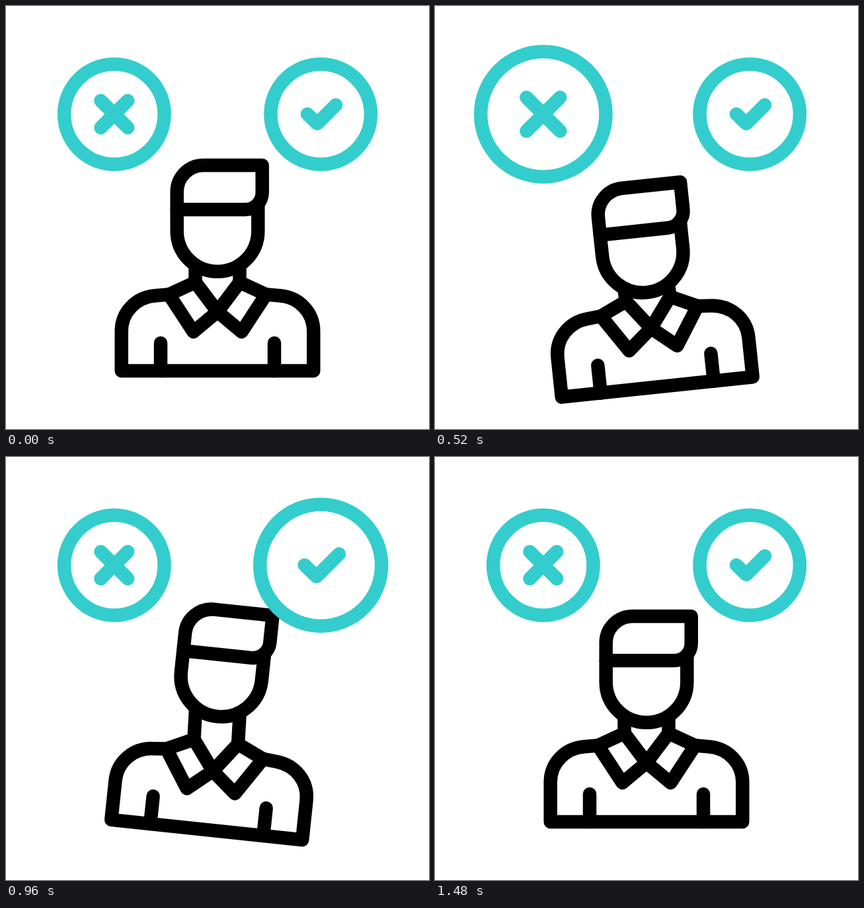
These frames come from a looping animation (640 px wide and 640 px high, 1.64 s). An HTML page with a canvas:

```html
<!DOCTYPE html>
<html lang="en">
<head>
<meta charset="utf-8">
<title>Yes or no</title>
<style>
  html, body { margin: 0; width: 100%; height: 100%; overflow: hidden; background: #fff; }
  canvas { display: block; width: 100vw; height: 100vh; }
</style>
</head>
<body>
<canvas id="stage" width="640" height="640"></canvas>
<script>
const ctx = document.getElementById('stage').getContext('2d');
const LOOP = 1640, STEP = 40;
const TEAL = '#33cdcd', BLACK = '#000';
const PIVOT = { x: 320, y: 396.5 };

// Tracks: [start value, [from step, to step, value], ...]
const TILT = [0, [1, 6.4, -6], [13, 20.1, 6], [24.6, 31, 0]];
const HEAD_DROP = [0, [1.7, 13.7, 32], [13, 22.5, -9], [24, 31, 0]];
const BODY_DROP = [0, [2.4, 15.5, 28], [16, 31.2, 0]];
const NO_SCALE = [1, [1.2, 12.4, 1.25], [13, 24, 1]];
const YES_SCALE = [1, [14.8, 26.2, 1.238], [26, 35.8, 1]];

function valueAt([start, ...moves], step) {
  let value = start;
  for (const [from, to, end] of moves) {
    if (step <= from) break;
    const p = Math.min(1, (step - from) / (to - from));
    value += (end - value) * p * p * (3 - 2 * p);
  }
  return value;
}

function polyline(points, closed) {
  ctx.beginPath();
  points.forEach(([x, y]) => ctx.lineTo(x, y));
  if (closed) ctx.closePath();
  ctx.stroke();
}

function badge(x, y, scale, marks) {
  ctx.strokeStyle = TEAL;
  ctx.beginPath();
  ctx.arc(x, y, 75.75 * scale, 0, Math.PI * 2);
  ctx.stroke();
  for (const mark of marks) {
    polyline(mark.map(([dx, dy]) => [x + dx * scale, y + dy * scale]));
  }
}

// Tilts around the figure's middle, then shifts straight down.
function placed(tilt, drop, draw) {
  ctx.save();
  ctx.translate(PIVOT.x, PIVOT.y + drop);
  ctx.rotate(tilt);
  ctx.translate(-PIVOT.x, -PIVOT.y);
  draw();
  ctx.restore();
}

function drawHead() {
  ctx.beginPath();
  ctx.moveTo(258.7, 308);
  ctx.lineTo(258.7, 281);
  ctx.arcTo(258.7, 241, 299, 241, 40);
  ctx.lineTo(387.7, 241);
  ctx.lineTo(387.7, 282);
  ctx.arcTo(387.7, 308, 362, 308, 25.7);
  ctx.closePath();
  ctx.stroke();

  ctx.beginPath();
  ctx.moveTo(258.7, 308);
  ctx.lineTo(258.7, 340.4);
  ctx.arc(320, 340.4, 61.3, Math.PI, 0, true);
  ctx.lineTo(381.3, 303);
  ctx.stroke();
}

function drawBody() {
  ctx.beginPath();
  ctx.moveTo(246.5, 436.5);
  ctx.lineTo(226, 438.3);
  ctx.bezierCurveTo(197, 440.5, 174.7, 463, 174.7, 492);
  ctx.lineTo(174.7, 552);
  ctx.lineTo(465.3, 552);
  ctx.lineTo(465.3, 492);
  ctx.bezierCurveTo(465.3, 463, 443, 440.5, 414, 438.3);
  ctx.lineTo(393.5, 436.5);
  ctx.stroke();

  for (const side of [-1, 1]) {
    const x = d => 320 + side * d;
    polyline([[x(33.5), 418], [x(73.5), 436.5], [x(36.5), 493], [x(0), 462.5]], true);
    polyline([[x(86), 510], [x(86), 552]]);
  }
}

// The neck stretches between the head and the collar.
function drawNeck(tilt, headDrop, bodyDrop) {
  const cos = Math.cos(tilt), sin = Math.sin(tilt);
  const spot = (x, y, drop) => {
    const dx = x - PIVOT.x, dy = y - PIVOT.y;
    return [PIVOT.x + dx * cos - dy * sin, PIVOT.y + drop + dx * sin + dy * cos];
  };
  ctx.lineCap = 'butt';
  for (const x of [286.5, 353.5]) {
    polyline([spot(x, 393, headDrop), spot(x, 418, bodyDrop)]);
  }
  ctx.lineCap = 'round';
}

function render(now) {
  const step = Math.floor((now % LOOP) / STEP);
  const tilt = valueAt(TILT, step) * Math.PI / 180;
  const headDrop = valueAt(HEAD_DROP, step);
  const bodyDrop = valueAt(BODY_DROP, step);

  ctx.fillStyle = '#fff';
  ctx.fillRect(0, 0, 640, 640);
  ctx.lineWidth = 20.5;
  ctx.lineCap = ctx.lineJoin = 'round';

  ctx.strokeStyle = BLACK;
  drawNeck(tilt, headDrop, bodyDrop);
  placed(tilt, bodyDrop, drawBody);
  placed(tilt, headDrop, drawHead);

  badge(163.8, 163.7, valueAt(NO_SCALE, step),
    [[[-20.4, -20.4], [20.4, 20.4]], [[20.4, -20.4], [-20.4, 20.4]]]);
  badge(476.2, 163.7, valueAt(YES_SCALE, step),
    [[[-20.2, -0.2], [-5.4, 14.2], [22.8, -14]]]);
}

let origin;
function tick(now) {
  origin ??= now;
  render(now - origin);
  requestAnimationFrame(tick);
}
render(0);
requestAnimationFrame(tick);
</script>
</body>
</html>
```
